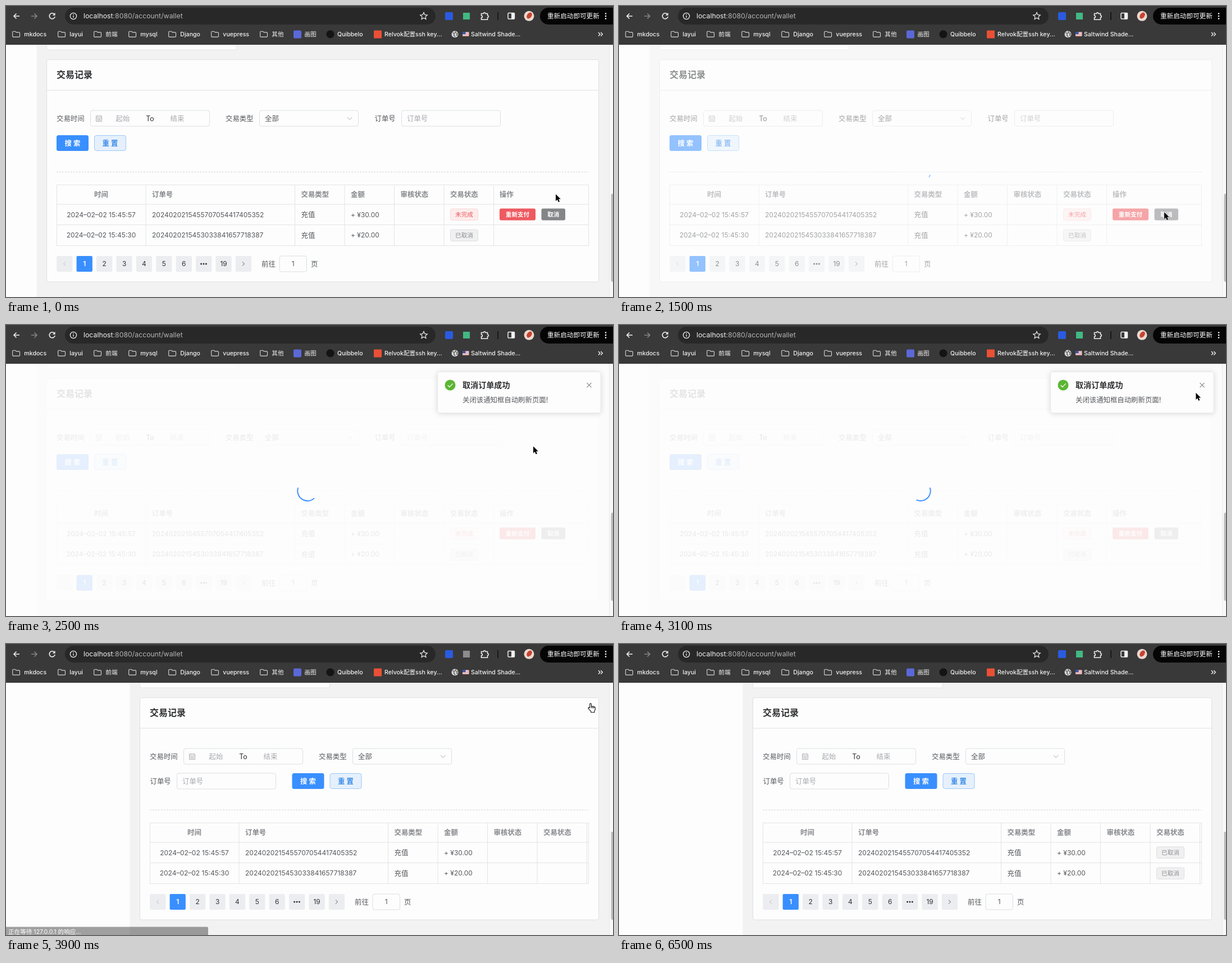
These frames come from a looping animation (1081 px wide and 518 px high, 6.6 s). An HTML page:

```html
<!DOCTYPE html>
<html lang="zh-CN">
<head>
<meta charset="utf-8">
<title>交易记录</title>
<style>
html, body { margin: 0; width: 100%; height: 100%; overflow: hidden; background: #fdfdfd; }
svg { display: block; width: 1081px; height: 518px; }
text { font-family: Inter, "Noto Sans CJK SC", "Noto Sans CJK", sans-serif; white-space: pre; }
</style>
</head>
<body>
<svg id="stage" viewBox="0 0 1081 518" xmlns="http://www.w3.org/2000/svg"></svg>
<script>
const LOOP = 6600;
const BLUE = '#398fff', LINE = '#dcdee3', GRID = '#e3e4e8', INK = '#55575b', SOFT = '#a6a8ad', HEAD = '#85878b';

// Markup helpers; text is centred vertically on y.
const text = (x, y, s, { size = 12.4, fill = INK, w = 400, mid = false } = {}) =>
  `<text x="${x}" y="${y + size * .37}" font-size="${size}" font-weight="${w}" fill="${fill}"${mid ? ' text-anchor="middle"' : ''}>${s}</text>`;
const rect = (x, y, w, h, fill, r = 0, stroke = 'none', more = '') =>
  `<rect x="${x}" y="${y}" width="${w}" height="${h}" rx="${r}" fill="${fill}" stroke="${stroke}" ${more}/>`;
const path = (d, stroke, w = 1, more = '') =>
  `<path d="${d}" fill="none" stroke="${stroke}" stroke-width="${w}" ${more}/>`;
const group = (x, y, s, more = '') => `<g transform="translate(${x} ${y})" ${more}>${s}</g>`;
const box = (x, y, w) => rect(x, y, w, 28, '#fdfdfd', 3.5, LINE);
const tag = (x, y, s, bg, edge, fill) =>
  rect(x + .5, y, 49, 20.5, bg, 3, edge) + text(x + 25, y + 10.2, s, { size: 10.6, fill, mid: true });
const voided = (x, y) => tag(x, y, '已取消', '#f0f0f1', '#dedfe1', '#8b8d91');

function tabular(fresh) {
  const rows = [['57', '2024020215455707054417405352', '30'], ['30', '2024020215453033841657718387', '20']];
  const cols = [249, 514.5, 603, 691.5, 780, 868.5];
  const heads = [[260, '订单号'], [525.5, '交易类型'], [614, '金额'], [702.5, '审核状态'], [791, '交易状态'], [879, '操作']];
  const right = fresh ? 871.5 : 1037.5;
  let s = rect(90.5, 318.5, right - 90.5, 108, 'none', 0, GRID);
  s += path(`M90.5 353H${right}M90.5 389.5H${right}` + cols.map(x => `M${x} 318.5V426.5`).join(''), GRID);
  s += text(169.5, 335.5, '时间', { fill: HEAD, w: 600, mid: true });
  s += heads.slice(0, fresh ? 5 : 6).map(([x, h]) => text(x, 335.5, h, { fill: HEAD, w: 600 })).join('');
  rows.forEach(([sec, id, sum], i) => {
    const y = 371.5 + i * 36.5;
    s += text(169.5, y, `2024–02–02 15:45:${sec}`, { size: 12, mid: true });
    s += text(260, y, id, { size: 12 }) + text(525.5, y, '充值') + text(614, y, `+ ¥${sum}.00`, { size: 12 });
  });
  if (fresh) return s + `<g id="tags">${voided(791, 361)}${voided(791, 398)}</g>`;
  const bold = { size: 10.6, fill: '#fff', w: 600, mid: true };
  return s + tag(791, 361, '未完成', '#fdecec', '#fad9d9', '#ea5c60') + voided(791, 398)
    + rect(879, 360.5, 64, 21, '#ee5a60', 3) + text(911, 371, '重新支付', bold)
    + rect(953.5, 360.5, 42.5, 21, '#848589', 3, 'none', 'id="cancel"') + text(974.8, 371, '取消', bold);
}

function pager() {
  let s = '';
  ['', 1, 2, 3, 4, 5, 6, '', 19, ''].forEach((n, i) => {
    const x = 90.2 + i * 35.4, on = i === 1;
    s += rect(x, 445, 28.3, 28, on ? BLUE : '#ecedf0', 2);
    s += text(x + 14.2, 459, n, { size: 12, fill: on ? '#fff' : '#303133', w: on ? 600 : 400, mid: true });
  });
  s += path('M106 455.5l-3.5 3.5 3.5 3.5', '#b9bbc0') + path('M421 455.5l3.5 3.5-3.5 3.5', '#55575b');
  for (const x of [347.6, 352, 356.4]) s += `<circle cx="${x}" cy="459" r="1.5" fill="#303133"/>`;
  return s + text(455, 459, '前往') + box(487, 445, 48.5) + text(511.2, 459, 1, { size: 12, mid: true }) + text(543, 459, '页');
}

function page(fresh) {
  const dx = fresh ? 166 : 0;
  const order = text(656.5, 200, '订单号') + box(704.5, 186, 176) + text(714, 200, '订单号', { fill: SOFT });
  const buttons = rect(90, 230, 57, 28, BLUE, 3.5) + text(118.5, 244, '搜 索', { fill: '#fff', w: 600, mid: true })
    + rect(157.5, 230.5, 56, 27, '#e5f0fc', 3.5, '#9cc8f7') + text(185.5, 244, '重 置', { fill: '#398ae6', w: 600, mid: true });
  const form = text(90, 200, '交易时间') + box(150.5, 186, 212)
    + path('M160.5 196h10v9.5h-10zM160.5 199h10M163 194.5v2.5M168 194.5v2.5M162 201.3h7M162 203.4h7', SOFT, .9)
    + text(208, 200, '起始', { fill: SOFT, mid: true }) + text(256.5, 200, 'To', { fill: '#303133', mid: true })
    + text(305, 200, '结束', { fill: SOFT, mid: true })
    + text(391, 200, '交易类型') + box(451.5, 186, 176) + text(461, 200, '全部') + path('M608 198l4.2 4.2 4.2-4.2', SOFT);
  return `<g id="${fresh ? 'after' : 'before'}">`
    + rect(0, 69, 1081, 449, '#f2f2f2') + rect(0, 69, 54.5 + dx, 449, '#fdfdfd')
    + rect(72.5 + dx, 60, 338, 18, '#fdfdfd', 3, '#e4e5e8')
    + rect(72.5 + dx, 95.5, 983 - dx, 395.5, '#fdfdfd', 3.5, '#dfe0e3')
    + path(`M${73 + dx} 150H1055`, '#dfe0e3')
    + path(`M${90 + dx} 295.5H1037.5`, '#d4d6da', 1, 'stroke-dasharray="3 2"')
    + group(dx, 0, text(90, 122.5, '交易记录', { size: 16, fill: '#303133', w: 600 }) + form + tabular(fresh) + pager())
    + (fresh ? path('M1037.5 318.5V426.5M1034 318.5H1037.5M1034 353H1037.5M1034 389.5H1037.5M1034 426.5H1037.5', GRID) : '')
    + group(fresh ? -400 : 0, fresh ? 44 : 0, order) + group(fresh ? 419.5 : 0, 0, buttons) + '</g>';
}

function browser() {
  const W = '#f0f0f0', mark = { size: 10.6, fill: '#f2f2f2', w: 500 };
  let s = rect(0, 0, 1081, 69, '#393939') + rect(105, 3, 660, 30, '#282828', 15);
  s += path('M24 18H14M18.5 13.5L14 18l4.5 4.5', W, 1.6) + path('M45 18h10M50.5 13.5L55 18l-4.5 4.5', '#858585', 1.6);
  s += `<g id="reload">${path('M86.2 14.7A5 5 0 1 0 87.2 18.8', W, 1.6)}<path d="M87.6 12v4.8h-4.8z" fill="${W}"/></g>`;
  s += path('M78 13.8l8.4 8.4M86.4 13.8l-8.4 8.4', W, 1.6, 'id="stop"');
  s += `<circle cx="120" cy="18" r="5.6" fill="none" stroke="${W}" stroke-width="1.3"/>` + path('M120 17.2v3.6M120 14.6v1.4', W, 1.4);
  s += text(138, 17.8, '<tspan fill="#f2f2f2">localhost</tspan>:8080/account/wallet', { size: 12.3, fill: '#b4b4b4' });
  s += path('M744 11.5l1.9 4.1 4.4.5-3.3 3 .9 4.4-3.9-2.2-3.9 2.2.9-4.4-3.3-3 4.4-.5z', W, 1.2);
  s += rect(782, 11, 14, 14, '#2a5be0', 2) + rect(814, 12, 12, 12, '#42b883', 0, 'none', 'id="devtool"');
  s += path('M846.5 13.5h4a1.7 1.7 0 0 1 3.4 0h3.6v3.3a1.8 1.8 0 0 1 0 3.6v3.8h-11v-3.4a1.9 1.9 0 0 0 0-3.8z', W, 1.5);
  s += path('M876 11v14', '#111', 1.6) + rect(894, 12.5, 11.5, 10.5, 'none', 1.5, W, 'stroke-width="1.5"') + rect(900, 12, 6, 11.5, W, 1);
  s += '<circle cx="931.5" cy="17.8" r="9" fill="#ead9d0"/><ellipse cx="932" cy="17" rx="4" ry="6" transform="rotate(35 932 17)" fill="#c8432f"/>';
  s += rect(951, 3, 145, 30, '#050505', 15) + text(964, 18, '重新启动即可更新', { size: 11.6, fill: '#fff', w: 500 });
  for (const y of [13.5, 18, 22.5]) s += `<circle cx="1068" cy="${y}" r="1.3" fill="#fff"/>`;
  for (const [x, name] of [[11, 'mkdocs'], [92, 'layui'], [156, '前端'], [218, 'mysql'], [289, 'Django'], [365, 'vuepress'], [452, '其他']]) {
    s += path(`M${x + .7} 46.5a1.3 1.3 0 0 1 1.3-1.3h3.6l1.6 1.7h5a1.3 1.3 0 0 1 1.3 1.3v5.6a1.3 1.3 0 0 1-1.3 1.3h-10.2a1.3 1.3 0 0 1-1.3-1.3z`, '#d8d8d8', 1.1);
    s += text(x + 21.3, 50, name, mark);
  }
  s += rect(512, 43.5, 14, 14, '#5b68d8', 2) + text(531.5, 50, '画图', mark);
  s += '<circle cx="577.5" cy="50.3" r="7" fill="#141414"/>' + text(590, 50, 'Quibbelo', mark);
  s += rect(655, 43.5, 14, 14, '#ea5036', 1) + text(674, 50, 'Relvok配置ssh key...', mark);
  s += '<circle cx="799.5" cy="50.3" r="6" fill="#d6d6d6"/>' + path('M795 47.5l3.5 1.2-1 3 2.5 3.5M801 45l-1 2.5 4 1.5-1.5 3 2 .5', '#4a4a4a', 1.2);
  s += rect(813, 46, 11.5, 8, '#f2f2f2', 1) + path('M813 47h11.5M813 50h11.5M813 53h11.5', '#d04a50', 1.2) + rect(813, 46, 5.5, 4.3, '#3a55a5');
  s += text(828, 50, 'Saltwind Shade...', mark);
  return s + path('M1055 47l3 3.2-3 3.2M1059.3 47l3 3.2-3 3.2', W, 1.4);
}

const notice = rect(768.5, 83.5, 290.5, 73, '#fdfdfd', 4, '#e8e9ec', 'filter="url(#shadow)"')
  + '<circle cx="791" cy="107" r="9.5" fill="#5cb534"/>' + path('M786.6 107.2l3.2 3.2 5.8-6', '#fff', 1.3)
  + text(813, 107, '取消订单成功', { size: 14.1, fill: '#303133', w: 600 }) + text(813, 133.3, '关闭该通知框自动刷新页面!')
  + path('M1034.5 103l8 8M1042.5 103l-8 8', '#8f9196', 1.1);

const arrow = '<path id="arrow" d="M0 0V12.2L2.8 9.6 4.7 14 7 13 5.1 8.8H8.8z" fill="#050505" stroke="#fff" stroke-width="1" paint-order="stroke"/>';
const hand = '<path id="hand" d="M-1.3 7.4V1.2a1.3 1.3 0 0 1 2.7 0V5.2q1.3-.9 2.4.3 1.3-.8 2.3.5 2-.5 2.2 1.3v3.2l-1.3 3v2.2H.8v-1.8L-3.8 9.1q-.9-1.7.8-2zM1.4 5.2v3M3.8 5.5v2.9M6.1 6v2.6" fill="#fff" stroke="#111" stroke-width="1.1" stroke-linejoin="round"/>';

document.getElementById('stage').innerHTML =
  '<defs><filter id="shadow" x="-10%" y="-30%" width="120%" height="160%"><feDropShadow dx="0" dy="1" stdDeviation="5" flood-opacity=".14"/></filter></defs>'
  + page(false) + page(true)
  + rect(0, 69, 1075, 449, '#fdfdfd', 0, 'none', 'id="mask"')
  + `<circle id="ring" r="17.7" fill="none" stroke="${BLUE}" stroke-width="1.9" stroke-linecap="round"/>`
  + `<g id="notice">${notice}</g>`
  + rect(1074.5, 69, 7, 449, '#f8f8f8') + path('M1074.5 69V518', '#e9e9e9') + rect(1077.5, 334, 6, 157, '#bcbcbc', 3)
  + browser()
  + `<g id="status">${rect(-4, 503.5, 364, 20, '#050505', 2)}${text(4, 512, '正在等待 127.0.0.1 的响应...', { size: 10.6, fill: '#fff' })}</g>`
  + `<g id="cursor">${arrow}${hand}</g>`;

const el = {};
document.querySelectorAll('[id]').forEach(n => el[n.id] = n);

const clamp = v => Math.max(0, Math.min(1, v));
const span = (t, a, b) => clamp((t - a) / (b - a));
const lerp = (a, b, k) => a + (b - a) * k;
const smooth = k => k * k * (3 - 2 * k);
function bezier(x1, y1, x2, y2) {
  const at = (a, b, u) => 3 * a * u * (1 - u) ** 2 + 3 * b * u * u * (1 - u) + u ** 3;
  return x => {
    let lo = 0, hi = 1;
    for (let i = 0; i < 20; i++) {
      const m = (lo + hi) / 2;
      if (at(x1, x2, m) < x) lo = m; else hi = m;
    }
    return at(y1, y2, lo);
  };
}
const ease = bezier(.25, .1, .25, 1), inOut = bezier(.42, 0, .58, 1);
const show = (n, on) => n.style.display = on ? '' : 'none';
const fade = (n, o) => n.setAttribute('opacity', o);

const MASK = 1410, CLOSE = 3500, SWAP = 3750;
const track = [[0, 979, 335], [100, 979, 335], [600, 971, 367], [1500, 971, 367], [1980, 969, 366],
  [2500, 939, 216], [2600, 939, 216], [3250, 1041, 106], [4300, 1041, 106], [4600, 1090, 118]];

function place(t) {
  let i = 1;
  while (i < track.length - 1 && track[i][0] < t) i++;
  const [a, b] = [track[i - 1], track[i]], k = smooth(span(t, a[0], b[0]));
  return [lerp(a[1], b[1], k), lerp(a[2], b[2], k)];
}

function spin(t) {
  const ms = t < 2500 ? t - MASK : lerp(1090, 3900, (t - 2500) / 1100);
  const p = ms % 1500 / 1500, grow = inOut(clamp(p * 2)), slide = inOut(clamp(p * 2 - 1));
  const unit = 17.7 / 20;
  el.ring.setAttribute('stroke-dasharray', `${lerp(1, 90, grow) * unit} ${lerp(200, 150, grow) * unit}`);
  el.ring.setAttribute('stroke-dashoffset', -(40 * grow + 80 * slide) * unit);
  el.ring.setAttribute('transform', `translate(537 295.3) rotate(${ms / 2000 * 360})`);
}

function draw(t) {
  const loading = t >= MASK && t < SWAP, shade = ease(span(t, MASK, MASK + 300));
  show(el.before, t < SWAP);
  show(el.after, t >= SWAP);
  show(el.tags, t >= 4150);
  show(el.mask, loading);
  show(el.ring, loading);
  if (loading) {
    fade(el.mask, .88 * shade);
    fade(el.ring, shade);
    spin(t);
  }
  show(el.notice, t >= 2000 && t < SWAP);
  el.notice.setAttribute('transform', `translate(${310 * (1 - ease(span(t, 2000, 2300)))} 0)`);
  fade(el.notice, 1 - ease(span(t, CLOSE, CLOSE + 300)));

  const over = t > 450 && t < MASK;
  el.cancel.setAttribute('fill', over ? '#a0a1a5' : '#848589');
  const [x, y] = place(t), pointing = over || t > 3180;
  show(el.cursor, t < 4600);
  el.cursor.setAttribute('transform', `translate(${x} ${y})`);
  show(el.arrow, !pointing);
  show(el.hand, pointing);

  const busy = t >= CLOSE && t < SWAP;
  show(el.stop, busy);
  show(el.reload, !busy);
  el.devtool.setAttribute('fill', t >= CLOSE && t < 4500 ? '#8c8c8c' : '#42b883');
  show(el.status, t >= CLOSE && t < 4050);
  fade(el.status, 1 - span(t, 3800, 3960));
}

function tick() {
  draw(performance.now() % LOOP);
  requestAnimationFrame(tick);
}
tick();
</script>
</body>
</html>
```
